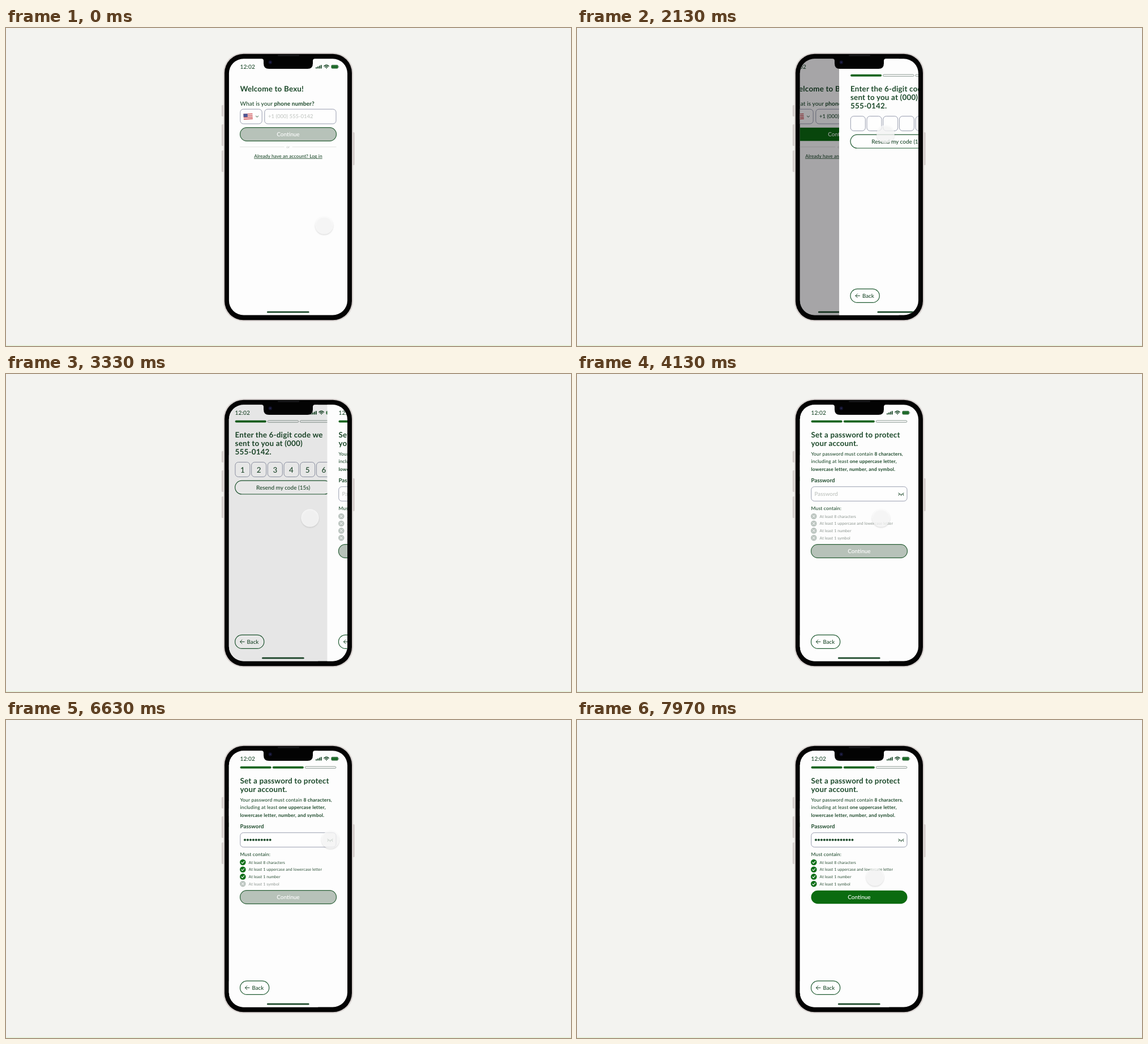
An HTML page for the animation above (8000 ms loop, 998 by 561 pixels).

```html
<!DOCTYPE html>
<html lang="en">
<head>
<meta charset="utf-8">
<title>Sign-up flow</title>
<style>
  html, body { margin: 0; width: 100%; height: 100%; overflow: hidden; background: #f3f3f0; }
  svg { display: block; width: 100%; height: 100%; }
  text { font-family: Lato, sans-serif; font-weight: 500; fill: #1d4a2b; text-rendering: geometricPrecision; white-space: pre; }
  .b { font-weight: 700; }
  .title { font-size: 13.4px; font-weight: 700; letter-spacing: .2px; }
  .label { font-size: 10.1px; letter-spacing: .08px; }
  .input { font-size: 9.5px; }
  .button { font-size: 10px; text-anchor: middle; }
  .link { font-size: 8.4px; letter-spacing: .09px; text-anchor: middle; text-decoration: underline; }
  .body { font-size: 8.5px; letter-spacing: .17px; }
  .rule { font-size: 7px; letter-spacing: .07px; }
  .digit { font-size: 13.4px; text-anchor: middle; }
  .or { font-size: 6.5px; text-anchor: middle; fill: #c4c8c4; }
  .line { fill: none; stroke: #1d4a2b; stroke-linecap: round; stroke-linejoin: round; }
  .field { fill: #fefefe; stroke: #8d92a6; stroke-width: .9; }
  .pill { fill: #fefefe; stroke: #1f5a31; stroke-width: 1.2; }
</style>
</head>
<body>
<svg id="stage" viewBox="0 0 998 561" preserveAspectRatio="none"></svg>
<script>
const LOOP = 8000;
const WIDTH = 209.5;
const PHONE = '+1 (000) 555-0142';
const GREEN = '#0b6b10';
const SHELL = '#d6d0ce';
const $ = id => document.getElementById(id);

const rect = (x, y, w, h, r = 0, attrs = '') =>
  `<rect x="${x}" y="${y}" width="${w}" height="${h}" rx="${r}" ${attrs}/>`;
const text = (x, y, cls, content, attrs = '') =>
  `<text x="${x}" y="${y}" class="${cls}" ${attrs}>${content}</text>`;
const path = (d, attrs = '') => `<path d="${d}" class="line" ${attrs}/>`;
const bold = s => `<tspan class="b">${s}</tspan>`;
const repeat = (n, make) => Array.from({ length: n }, (_, i) => make(i)).join('');

const statusBar = () =>
  text(413.5, 72, 'label', '12:02', 'font-weight="600"') +
  repeat(4, i => rect(547 + i * 2.9, 69.2 - i * 1.3, 2, 2.3 + i * 1.3, .5, 'fill="#1d4a2b"')) +
  path('M561.8 67.2Q566 63.6 570.2 67.2M563.6 69Q566 67 568.4 69', 'stroke-width="1.5"') +
  '<circle cx="566" cy="70.6" r="1" fill="#1d4a2b"/>' +
  rect(574.5, 65.2, 12.2, 6.2, 1.8, 'fill="#1f6b2b" stroke="#789080" stroke-width=".6"') +
  rect(587.3, 67.2, 1, 2.2, .5, 'fill="#789080"');

const progress = done => repeat(3, i =>
  rect(413.8 + i * 57.2, 82.1, 54.6, 3.2, 1.6,
    i < done ? 'fill="#17641f" stroke="#17641f" stroke-width=".6"'
             : 'fill="#fefefe" stroke="#7d8d86" stroke-width=".9"'));

const backButton = () =>
  rect(413.5, 460.4, 51.2, 24, 12, 'class="pill"') +
  path('M430 472.4H422.5M425.8 469L422.4 472.4L425.8 475.8', 'stroke-width="1"') +
  text(434.5, 475.9, '', 'Back', 'font-size="9.7"');

const continueButton = (id, y) =>
  rect(413.5, y, 170, 23.6, 11.8, `id="${id}"`) +
  text(498.4, y + 15.3, 'button', 'Continue', 'style="fill:#fff"');

const screen = (id, content) => `<g id="${id}">` +
  rect(393.5, 54, 210, 453, 0, 'fill="#fdfdfd"') + statusBar() + content +
  rect(461, 499.8, 74.5, 2.7, 1.35, 'fill="#1d4a2b"') +
  rect(393.5, 54, 210, 453, 0, `id="${id}Dim" fill="#040008" opacity="0"`) + '</g>';

const flag = () => `<g transform="rotate(-3 427.5 156)">` +
  repeat(7, i => rect(419.6, 151.2 + i * 1.43, 16, 1.45, 0, `fill="${i % 2 ? '#f3e6e4' : '#cf4a50'}"`)) +
  rect(419.6, 151.2, 7.2, 5.6, 0, 'fill="#4a5796"') + '</g>';

const phoneScreen = () =>
  text(413.5, 111.8, 'title', 'Welcome to Bexu!') +
  text(413.5, 136.5, 'label', 'What is your ' + bold('phone number?')) +
  rect(413.8, 143.2, 38.4, 25.8, 5.5, 'class="field"') + flag() +
  path('M441.4 155.2L443.5 157.2L445.6 155.2', 'stroke-width="1"') +
  rect(456.8, 143.2, 126.2, 25.8, 5.5, 'class="field"') +
  text(463, 159.4, 'input', PHONE, 'id="phone"') +
  continueButton('phoneNext', 175.7) +
  path('M413.5 209.8H491M506 209.8H583', 'style="stroke:#dfe1dd;stroke-width:.9"') +
  text(498.4, 211.8, 'or', 'or') +
  text(498.4, 228.8, 'link', 'Already have an account? Log in');

const codeScreen = () => progress(1) +
  text(413.5, 111.8, 'title', 'Enter the 6-digit code we') +
  text(413.5, 127, 'title', 'sent to you at (000)') +
  text(413.5, 142, 'title', '555-0142.') +
  repeat(6, i => rect(413.8 + i * 28.7, 155.6, 26, 25.8, 5.5, 'class="field"') +
    text(426.8 + i * 28.7, 173.6, 'digit', i + 1, `id="digit${i}"`)) +
  rect(413.5, 188.2, 170, 23.8, 11.9, 'class="pill"') +
  text(498.4, 203.6, 'button', 'Resend my code (15s)') + backButton();

const rules = ['8 characters', '1 uppercase and lowercase letter', '1 number', '1 symbol'];
const ruleRow = (rule, i) => {
  const y = 251 + i * 12.7;
  return `<g id="rule${i}"><circle cx="418.3" cy="${y}" r="5.3"/>` +
    path(`M416.3 ${y - 2}l4 4m0 -4l-4 4`, 'data-mark="no" style="stroke:#fff;stroke-width:1"') +
    path(`M415.9 ${y + .2}l1.7 1.7l3.2 -3.6`, 'data-mark="yes" style="stroke:#fff;stroke-width:1.1"') +
    text(428.6, y + 2.5, 'rule', 'At least ' + rule) + '</g>';
};

const passwordScreen = () => progress(2) +
  text(413.5, 111.8, 'title', 'Set a password to protect') +
  text(413.5, 127, 'title', 'your account.') +
  text(413.5, 143.9, 'body', 'Your password must contain ' + bold('8 characters') + ',') +
  text(413.5, 157.3, 'body', 'including at least ' + bold('one uppercase letter,')) +
  text(413.5, 170.7, 'body', bold('lowercase letter, number, and symbol.')) +
  text(413.5, 191.3, 'label b', 'Password', 'style="font-size:9.7px"') +
  rect(413.8, 198.8, 169.2, 25.4, 5.5, 'class="field"') +
  text(419.5, 215, 'input', 'Password', 'id="hint" style="fill:#bcc1bc;font-size:9.8px"') +
  repeat(14, i => `<circle id="dot${i}" cx="${422 + i * 4.96}" cy="211.5" r="1.95" fill="#1d4a2b"/>`) +
  path('M568 210Q572.5 215 577 210M569.4 212L568.2 214M572.5 212.8V214.6M575.6 212L576.8 214', 'stroke-width="1.1"') +
  text(413.5, 239.8, 'body', 'Must contain:') +
  rules.map(ruleRow).join('') +
  continueButton('passwordNext', 300.7) + backButton();

const sideButton = (x, y, h) => rect(x, y, 5, h, 1.5, `fill="${SHELL}"`);

$('stage').innerHTML =
  `<defs><clipPath id="glass">${rect(393.8, 54.2, 209.2, 452.4, 26)}</clipPath>
   <filter id="soft" x="-30%" y="-30%" width="160%" height="160%"><feGaussianBlur stdDeviation="1.1"/></filter></defs>` +
  rect(0, 0, 998, 561, 0, 'fill="#f3f3f0"') +
  rect(0, 559.6, 998, 1.4, 0, 'fill="#e3f2d8"') +
  sideButton(380.8, 136, 20) + sideButton(380.8, 170, 38) + sideButton(380.8, 216, 38) +
  sideButton(610.8, 184, 58) +
  rect(383.8, 43.7, 229.4, 473.6, 35.5, `fill="${SHELL}"`) +
  rect(386, 45.8, 225, 469.4, 33.5, 'fill="#030303"') +
  '<g clip-path="url(#glass)">' +
  screen('first', phoneScreen()) + screen('second', codeScreen()) + screen('third', passwordScreen()) +
  '</g>' +
  `<path d="M451 54H546Q542 54 542 58V62.5Q542 72 532.5 72H464.5Q455 72 455 62.5V58Q455 54 451 54Z" fill="#030303"/>` +
  rect(480, 47.6, 38, 1.8, .9, 'fill="#1c1c1f"') +
  '<circle cx="466.8" cy="60.5" r="3.2" fill="#12122a"/><circle cx="466.8" cy="60.5" r="1.2" fill="#2a2a58"/>' +
  `<g id="cursor"><circle cy="1.3" r="15.8" fill="#555" opacity=".2" filter="url(#soft)"/>
   <circle id="touch" r="15.8" fill-opacity=".75"/></g>`;

// CSS-style ease-in-out, solved for x by bisection
const ease = x => {
  if (x <= 0) return 0;
  if (x >= 1) return 1;
  let lo = 0, hi = 1, u;
  for (let i = 0; i < 20; i++) {
    u = (lo + hi) / 2;
    const at = 3 * u * (1 - u) ** 2 * .42 + 3 * u * u * (1 - u) * .58 + u ** 3;
    if (at < x) lo = u; else hi = u;
  }
  return u * u * (3 - 2 * u);
};
const tween = (t, start, length) => ease((t - start) / length);
const typed = (t, times) => times.filter(at => t >= at).length;
const every = (n, start, gap) => Array.from({ length: n }, (_, i) => start + i * gap);

const phoneKeys = every(PHONE.length, 640, 32);
const codeKeys = every(6, 2430, 100);
const passwordKeys = [...every(8, 5010, 80), 5800, 5890, ...every(4, 6720, 120)];
const ruleNeeds = [8, 2, 9, 11];

// [start, length, x, y]
const moves = [
  [900, 573, 545, 187],
  [2350, 500, 537, 254],
  [4350, 550, 573, 211],
  [7500, 746, 508, 303]
];

const show = (el, on) => el.setAttribute('visibility', on ? 'inherit' : 'hidden');

function setButton(id, on) {
  const el = $(id);
  el.setAttribute('fill', on ? GREEN : '#b7c2b9');
  el.setAttribute('stroke', on ? 'none' : '#2c6139');
  el.setAttribute('stroke-width', 1.2);
}

// A screen enters from the right, then drifts left and dims under the next one.
function placeScreen(id, entered, covered) {
  const x = WIDTH * (1 - entered) - WIDTH * .25 * covered;
  $(id).setAttribute('transform', `translate(${x} 0)`);
  $(id + 'Dim').setAttribute('opacity', .52 * covered);
  show($(id), entered > 0);
}

function render(t) {
  const toCode = tween(t, 1795, 560);
  const toPassword = tween(t, 3171, 560);
  placeScreen('first', 1, toCode);
  placeScreen('second', toCode, toPassword);
  placeScreen('third', toPassword, 0);

  const keys = typed(t, phoneKeys);
  $('phone').textContent = keys ? PHONE.slice(0, keys) : PHONE;
  $('phone').style.fill = keys ? '' : '#c3c7c3';
  setButton('phoneNext', keys === PHONE.length);

  const digits = typed(t, codeKeys);
  for (let i = 0; i < 6; i++) show($('digit' + i), i < digits);

  const dots = typed(t, passwordKeys);
  show($('hint'), !dots);
  for (let i = 0; i < 14; i++) show($('dot' + i), i < dots);
  ruleNeeds.forEach((need, i) => {
    const met = dots >= need;
    const row = $('rule' + i);
    row.querySelector('circle').setAttribute('fill', met ? '#10701a' : '#bcc5c0');
    row.querySelector('text').style.fill = met ? '#3a5c44' : '#929b95';
    show(row.querySelector('[data-mark=no]'), !met);
    show(row.querySelector('[data-mark=yes]'), met);
  });
  setButton('passwordNext', dots > 10);

  let x = 562, y = 348;
  for (const [start, length, toX, toY] of moves) {
    const p = tween(t, start, length);
    x += (toX - x) * p;
    y += (toY - y) * p;
  }
  $('cursor').setAttribute('transform', `translate(${x} ${y})`);
  $('touch').setAttribute('fill', t > 1250 && t < 1650 ? '#e2e4e2' : '#fdfdfd');
}

const origin = performance.now();
function tick() {
  render((performance.now() - origin) % LOOP);
  requestAnimationFrame(tick);
}
tick();
</script>
</body>
</html>
```
